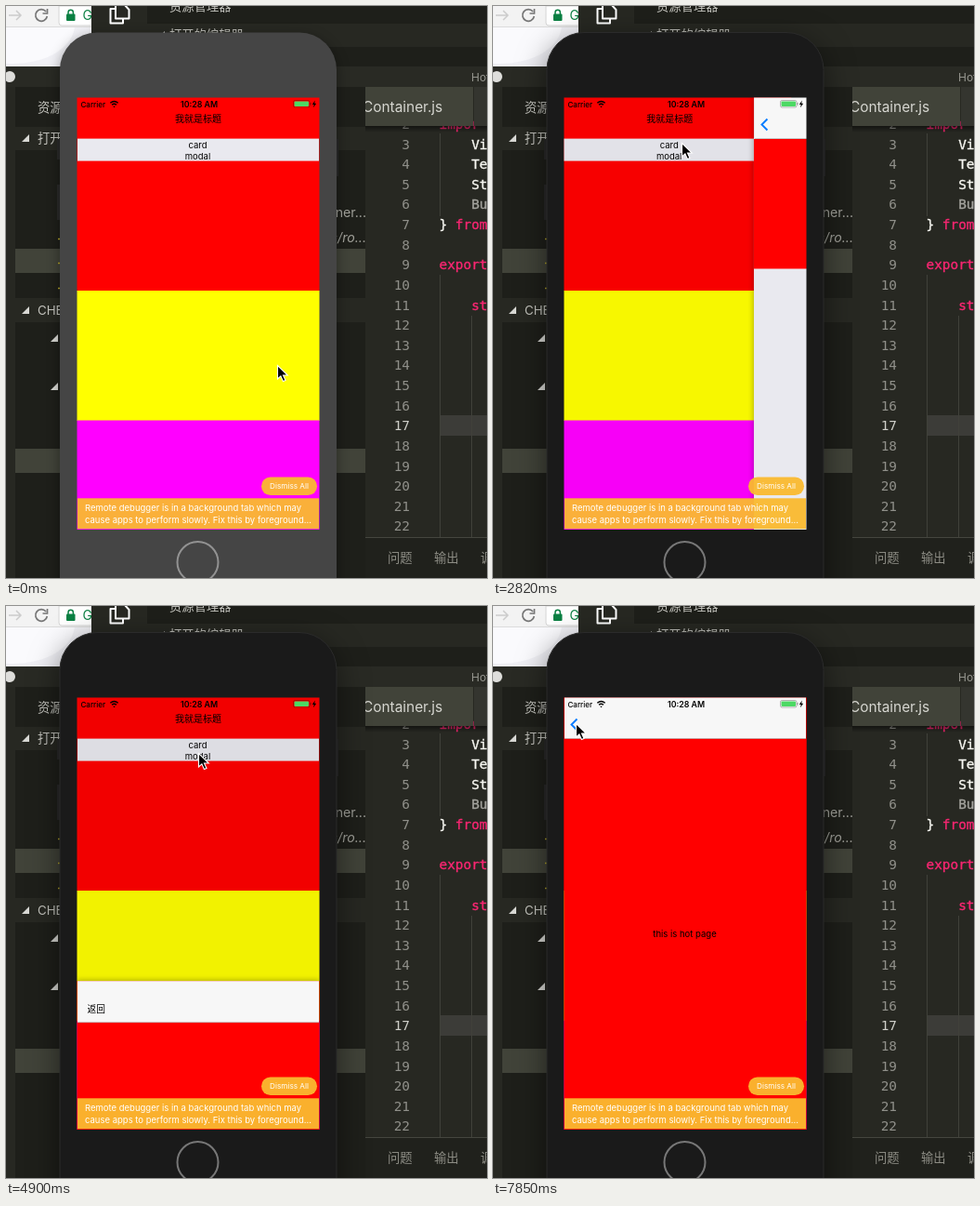
These frames come from a looping animation (518 px wide and 615 px high, 7990 ms). An HTML page:

```html
<!DOCTYPE html>
<html lang="zh">
<head>
<meta charset="utf-8">
<style>
html, body { margin: 0; width: 100%; height: 100%; overflow: hidden; background: #1e1f1a; }
svg { display: block; width: 518px; height: 615px; }
text { font-family: Inter, "Noto Sans CJK SC", "Noto Sans CJK", sans-serif; white-space: pre; }
.code text { font: 14.4px "DejaVu Sans Mono", monospace; stroke-width: .35; }
.ide { font-size: 13.3px; fill: #c4c4be; }
.path { font-size: 14.2px; fill: #a2a29b; text-anchor: end; }
.app { font-size: 9.5px; }
.mid { text-anchor: middle; }
.sheet { filter: drop-shadow(0 0 3px rgba(0, 0, 0, .35)); }
#phone { fill: #454545; filter: drop-shadow(0 4px 7px rgba(0, 0, 0, .4)); }
#ring { fill: none; stroke: #929292; stroke-width: 2; }
.active #phone { fill: #1a1a1a; stroke: #2b2b2b; filter: drop-shadow(0 9px 16px rgba(0, 0, 0, .5)); }
.active #ring { stroke: #777; }
</style>
</head>
<body>
<svg id="stage" viewBox="0 0 518 615">
  <defs>
    <clipPath id="screen"><rect x="76.500" y="98.500" width="261" height="464.500"/></clipPath>
    <linearGradient id="fade" x2="0" y2="1"><stop stop-opacity=".5"/><stop offset="1" stop-opacity="0"/></linearGradient>
    <path id="fold" d="M8 0V8H0Z" fill="#d8d8d4"/>
    <path id="back" d="M90.500 121.500L84.500 127.500L90.500 133.500" fill="none" stroke="#0a7cff" stroke-width="1.900"/>
    <g id="bar">
      <rect x="77" y="98" width="260" height="44.500" fill="#f7f7f7"/>
      <path d="M77 142.500H337" stroke="#b2b2b2" stroke-width=".7"/>
    </g>
  </defs>

  <!-- browser behind -->
  <rect width="92" height="65" fill="#f0f0f5"/>
  <ellipse cx="8" cy="20" rx="66" ry="42" fill="#fafafd"/>
  <rect width="92" height="22" fill="#f3f3f3"/>
  <path d="M57 0H92V21H60Q57 21 57 18Z" fill="#fff" stroke="#d4d4d4"/>
  <path d="M0 22.500H92" stroke="#dcdcdc"/>
  <path d="M3 10H16M11 5L16 10L11 15" fill="none" stroke="#ccc" stroke-width="1.500"/>
  <path d="M43 6A6.300 6.300 0 1 0 44.300 11M44.500 3V8H39.500" fill="none" stroke="#777" stroke-width="1.700"/>
  <path d="M67 9V7A2.700 2.700 0 0 1 72.400 7V9" fill="none" stroke="#0b8043" stroke-width="1.500"/>
  <rect x="65" y="8.500" width="9.500" height="7.500" rx="1" fill="#0b8043"/>
  <text x="82.500" y="15" font-size="14" fill="#0b8043">G</text>

  <!-- editor window behind -->
  <rect x="92" width="426" height="65" fill="#272822"/>
  <rect x="152" width="366" height="65" fill="#1e1f1a"/>
  <rect x="152" y="19" width="366" height="25" fill="#272822"/>
  <path d="M118 -2V13.500H132.500V4L127 -2ZM118 3H112.500V18.500H126V13.500" fill="none" stroke="#fff" stroke-width="2" stroke-linejoin="round"/>
  <text class="ide" x="176" y="5">资源管理器</text>
  <use href="#fold" x="163" y="27"/>
  <text class="ide" x="176" y="36">打开的编辑器</text>

  <!-- front editor window -->
  <rect y="65" width="518" height="550" fill="#272822"/>
  <rect x="467" y="440" width="51" height="22" fill="#3c3c38"/>
  <path d="M467.500 137V226M467.500 289V571M501.500 333V571" stroke="#40413a"/>
  <g class="code" id="code"></g>
  <rect x="387" y="129" width="131" height="7" fill="url(#fade)"/>
  <rect x="387" y="87" width="116" height="42" fill="#414339"/>
  <rect x="504" y="87" width="14" height="42" fill="#34352f"/>
  <text x="384" y="114" font-size="15.400" fill="#d6d6d0">Container.js</text>
  <rect x="387" y="571" width="131" height="44" fill="#20211c"/>
  <path d="M387 571.500H518" stroke="#45463f"/>
  <g class="ide" style="fill:#8d8d85">
    <text x="411" y="598">问题</text><text x="461" y="598">输出</text><text x="511" y="598">调</text>
  </g>
  <rect y="65" width="518" height="22" fill="#292a24"/>
  <text x="501" y="80.500" font-size="12" fill="#96968f">Hot</text>
  <circle cx="4" cy="76" r="6" fill="#dededb"/>
  <rect x="10" y="87" width="377" height="528" fill="#1e1f1a"/>
  <path d="M10 130H387V155H10ZM10 314H387V340H10Z" fill="#272822"/>
  <path d="M10 261H387V287H10ZM10 476H387V502H10Z" fill="#414339"/>
  <g class="ide">
    <text x="34" y="114">资源管</text><text x="34" y="147">打开</text><text x="34" y="332">CHE</text>
  </g>
  <text class="path" x="388" y="227">ner...</text>
  <text class="path" x="388" y="254" font-style="italic">s/ro...</text>
  <use href="#fold" x="17" y="138"/><use href="#fold" x="17" y="323"/>
  <use href="#fold" x="48" y="353"/><use href="#fold" x="48" y="405"/>
  <path d="M56 250.500H60M56 276.500H60M56 303.500H60" stroke="#b5a52a" stroke-width="1.500"/>

  <!-- phone -->
  <path d="M55 143H59V165H55ZM55 192H59V230H55ZM355 143H358V183H355Z" fill="#2a2a2a"/>
  <rect id="phone" x="58" y="28.500" width="298" height="640" rx="40"/>
  <circle id="ring" cx="206.500" cy="598" r="22"/>

  <g clip-path="url(#screen)">
    <g id="home">
      <rect x="76" y="98" width="262" height="208" fill="#f00"/>
      <rect x="76" y="306" width="262" height="140" fill="#ff0"/>
      <rect x="76" y="445.500" width="262" height="118" fill="#f0f"/>
      <rect x="77" y="142.600" width="260" height="24" fill="#e9e9ef"/>
      <g class="app mid">
        <text x="207" y="124.500" font-size="10">我就是标题</text>
        <text x="206.500" y="152.500">card</text>
        <text x="206.500" y="164.500">modal</text>
      </g>
    </g>
    <rect id="homeDim" x="76" y="98" width="262" height="465"/>

    <g id="card" class="sheet">
      <rect x="76" y="98" width="262" height="465" fill="#e9e9ef"/>
      <use href="#bar"/>
      <rect x="76" y="143" width="262" height="139.500" fill="#f00"/>
      <use href="#back"/>
      <text class="mid" x="206.500" y="131.500" font-size="11.500" font-weight="600">text</text>
      <circle cx="206.500" cy="391.300" r="28" fill="#f00"/>
      <circle cx="283.500" cy="391.300" r="28" fill="#ff0"/>
      <circle cx="360.500" cy="391.300" r="28" fill="#f0f"/>
    </g>

    <g id="modal" class="sheet">
      <rect x="76" y="98" width="262" height="465" fill="#f00"/>
      <g id="hot"><text class="app mid" x="206.500" y="356">this is hot page</text></g>
      <rect id="hotDim" x="76" y="98" width="262" height="465"/>
      <g id="next" class="sheet">
        <rect x="76" y="142" width="262" height="421" fill="#f00"/>
        <text class="app mid" x="206.500" y="356">this is hot page</text>
      </g>
      <use href="#bar"/>
      <text id="leave" x="87.500" y="131.500" font-size="9.700">返回</text>
      <use id="arrow" href="#back"/>
    </g>

    <!-- status bar -->
    <text x="80.500" y="108.500" font-size="8" font-weight="500">Carrier</text>
    <text class="mid" x="208" y="108.500" font-size="8.800" font-weight="600">10:28 AM</text>
    <path d="M112.300 104.300Q116.500 100.700 120.700 104.300M114 106.300Q116.500 104.100 119 106.300" fill="none" stroke="#000" stroke-width="1.300"/>
    <path d="M115.200 107.700H117.800L116.500 109.200Z"/>
    <rect x="309.500" y="101.500" width="17.500" height="7.500" rx="1.800" fill="none" stroke="#000" stroke-opacity=".4" stroke-width=".7"/>
    <rect x="310.500" y="102.500" width="15.500" height="5.500" rx="1" fill="#4cd964"/>
    <path d="M328 104V106.500" stroke="#000" stroke-opacity=".4"/>
    <path d="M332.800 101.500L329.800 106H331.700L331 109.300L334.200 104.700H332.200Z"/>

    <!-- warning -->
    <g fill="#faba30" fill-opacity=".95">
      <rect x="77" y="529.300" width="260" height="32.900"/>
      <rect x="275" y="506.500" width="60" height="19.500" rx="9.750"/>
    </g>
    <g class="app" fill="#fff">
      <text x="85" y="543">Remote debugger is in a background tab which may</text>
      <text x="85" y="555.700">cause apps to perform slowly. Fix this by foreground...</text>
      <text class="mid" x="305" y="519.300" font-size="8.200">Dismiss All</text>
    </g>
  </g>
  <path id="cursor" d="M.5 .5V15L3.900 11.900L6.400 17.500L9 16.400L6.500 11H11.300Z" stroke="#fff" stroke-width="1.100"/>
</svg>
<script>
const $ = id => document.getElementById(id);
const LOOP = 7990, HOLD = 290, W = 261, H = 465;

// Each entry: line, column, text, colour
const source = [
  [2, 0, 'impor', '#f92672'], [3, 4, 'Vi', '#f8f8f2'], [4, 4, 'Te', '#f8f8f2'],
  [5, 4, 'St', '#f8f8f2'], [6, 4, 'Bu', '#a5a59f'], [7, 0, '}', '#f8f8f2'],
  [7, 2, 'from', '#f92672'], [9, 0, 'export', '#f92672'], [11, 4, 'st', '#f92672']
];
const lineY = n => 153.5 + (n - 3) * 21.63;
let code = '';
for (let n = 2; n <= 22; n++)
  code += `<text x="435" y="${lineY(n)}" text-anchor="end" fill="${n === 17 ? '#d0d0ca' : '#90908a'}">${n}</text>`;
for (const [n, col, word, color] of source)
  code += `<text x="${466.5 + col * 8.67}" y="${lineY(n)}" fill="${color}" stroke="${color}">${word}</text>`;
$('code').innerHTML = code;

// Pointer path: time, x, y
const path = [
  [0, 292, 386], [290, 275, 368], [440, 259, 353], [600, 259, 353], [1040, 243, 290],
  [1480, 215, 195], [1780, 205, 165], [2370, 203, 147], [2820, 203, 147], [3115, 139, 134],
  [3420, 90, 126], [3720, 88, 126], [3856, 116, 129], [4160, 182, 149], [4600, 207, 158],
  [5050, 207, 158], [5500, 196, 255], [5930, 185, 339], [6080, 191, 350], [6680, 191, 350],
  [7100, 166, 250], [7410, 136, 158], [7700, 98, 134], [7840, 89, 126]
];

function pointer(t) {
  const i = path.findIndex(p => p[0] > t);
  if (i < 0) return path[path.length - 1].slice(1);
  const [a, b] = [path[i - 1], path[i]], f = (t - a[0]) / (b[0] - a[0]);
  return [a[1] + (b[1] - a[1]) * f, a[2] + (b[2] - a[2]) * f];
}

// cubic-bezier(.2833, .99, .31833, .99) over 500 ms
function slide(t, start) {
  const x = (t - start) / 500;
  if (x <= 0) return 0;
  if (x >= 1) return 1;
  const curve = (s, a, b) => 3 * s * (1 - s) * ((1 - s) * a + s * b) + s ** 3;
  let lo = 0, hi = 1;
  for (let i = 0; i < 24; i++) {
    const mid = (lo + hi) / 2;
    if (curve(mid, .2833, .31833) < x) lo = mid; else hi = mid;
  }
  return curve(lo, .99, .99);
}

const move = (id, x, y = 0) => $(id).setAttribute('transform', `translate(${x} ${y})`);
const alpha = (id, a) => $(id).setAttribute('opacity', a);
const show = (id, on) => $(id).setAttribute('visibility', on ? 'visible' : 'hidden');

const stepped = t => t < HOLD ? 0 : HOLD + Math.floor((t - HOLD) / 148.1) * 148.6;

function draw(now) {
  const t = stepped(now % LOOP);
  const card = slide(t, 2785) - slide(t, 3739);
  const modal = slide(t, 4845.8);
  const next = slide(t, 6362);

  $('stage').classList.toggle('active', t > 2660);
  move('home', -.3 * W * card);
  alpha('homeDim', .15 * Math.max(card, modal));
  move('card', W * (1 - card));
  show('card', card > 0);
  move('modal', 0, H * (1 - modal));
  show('modal', modal > 0);
  move('hot', -.3 * W * next);
  alpha('hotDim', .15 * next);
  move('next', W * (1 - next));
  alpha('next', next > 0 ? 1 : 0);
  alpha('leave', 1 - next);
  move('leave', 3 * next);
  alpha('arrow', next ** 4);
  move('cursor', ...pointer(t));
  requestAnimationFrame(draw);
}
requestAnimationFrame(draw);
</script>
</body>
</html>
```
